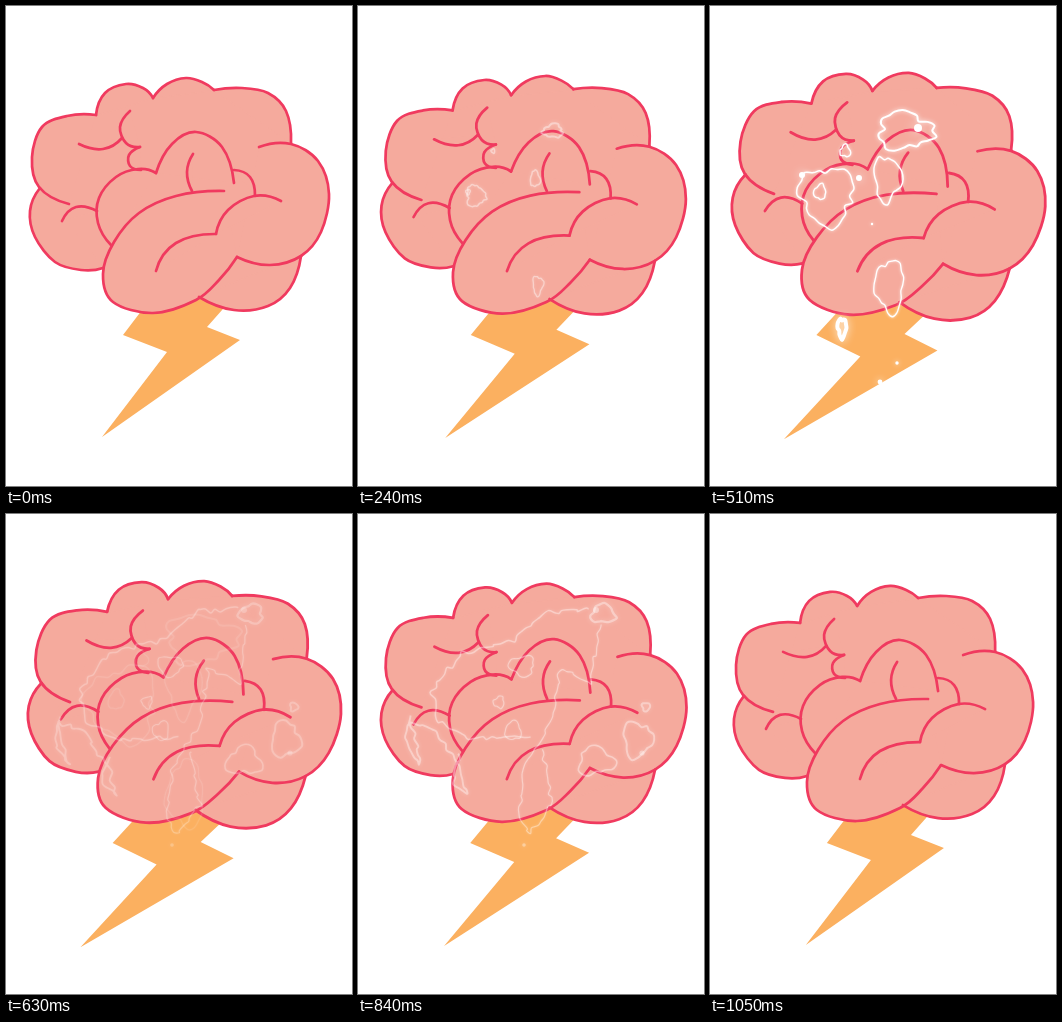
Write an HTML page with a canvas that moves like this. It is 346 by 480 pixels and loops after 1.08 s.

```html
<!DOCTYPE html>
<html lang="en">
<head>
<meta charset="utf-8">
<title>Brainstorm</title>
<style>
html, body { margin: 0; width: 100%; height: 100%; overflow: hidden; background: #fff; }
canvas { display: block; width: 346px; height: 480px; }
</style>
</head>
<body>
<canvas id="stage" width="346" height="480"></canvas>
<script>
const ctx = document.getElementById('stage').getContext('2d');
const LOOP = 1080, STEP = 30, PEAK = 560;
const PINK = '#f5aa9d', RED = '#f03a5f', ORANGE = '#fbb060';

const pair = flat => flat.reduce((out, v, i) =>
  (i % 2 ? out[out.length - 1].push(v) : out.push([v]), out), []);
const clamp = v => Math.max(0, Math.min(1, v));
const ramp = (t, a, b) => clamp((t - a) / (b - a));
const noise = n => {
  const v = Math.sin(n * 12.9898) * 43758.5453;
  return (v - Math.floor(v)) * 2 - 1;
};

// Smooth path through points; open ends continue their curvature.
function spline(pts, closed) {
  const n = pts.length;
  const extend = (a, b, c) => [0, 1].map(k => 3 * a[k] - 3 * b[k] + c[k]);
  const at = i => {
    if (closed) return pts[(i + n) % n];
    if (i < 0) return extend(pts[0], pts[1], pts[2]);
    if (i >= n) return extend(pts[n - 1], pts[n - 2], pts[n - 3]);
    return pts[i];
  };
  const path = new Path2D();
  path.moveTo(...pts[0]);
  for (let i = 0; i < (closed ? n : n - 1); i++) {
    const [p, a, b, q] = [at(i - 1), at(i), at(i + 1), at(i + 2)];
    path.bezierCurveTo(a[0] + (b[0] - p[0]) / 6, a[1] + (b[1] - p[1]) / 6,
                       b[0] - (q[0] - a[0]) / 6, b[1] - (q[1] - a[1]) / 6, ...b);
  }
  return path;
}

function polygon(flat) {
  const path = new Path2D();
  pair(flat).forEach(p => path.lineTo(...p));
  path.closePath();
  return path;
}

// Brain folds at rest, as key points.
const folds = [];
const fold = (...flat) => folds.push(spline(pair(flat)));
fold(63,198, 33,181, 26,151, 36,121, 61,110, 90,109);
fold(90,109, 99,87, 120,78, 137,82, 147,92);
fold(147,92, 161,78, 180,72, 196,76, 208,84);
fold(208,84, 236,82, 262,87, 280,105, 285,137);
fold(253,141, 285,138, 312,155, 323,188, 315,226, 295,250, 264,259, 231,251);
fold(295,250, 284,282, 262,300, 228,304, 193,291);
fold(231,251, 213,274, 190,294, 147,307, 107,296, 97,268, 108,236, 133,207, 170,190, 218,185);
fold(34,182, 24,205, 29,231, 49,256, 75,264, 97,262);
fold(56,215, 70,201, 91,205);
fold(105,239, 92,217, 93,192, 110,171, 132,163, 150,167);
fold(150,167, 166,138, 190,126, 216,141, 228,177);
fold(228,164, 244,171, 249,190);
fold(187,148, 181,166, 186,185);
fold(210,228, 222,204, 248,190, 275,195);
fold(150,265, 170,237, 210,228);
fold(73,138, 97,143, 116,132);
fold(124,105, 114,121, 120,137, 134,141);
fold(134,141, 123,149, 124,160, 135,164);

const core = polygon([34,182, 90,109, 147,92, 208,84, 285,137, 295,250, 193,291, 97,262]);
const bolt = polygon([152,283, 117,329, 161,346, 96,431, 234,334, 201,321, 232,286]);

// Electric shapes come in phases: [first seen, full, fading, gone].
const CHARGE = [180, 330, 530, 640], FLASH = [420, 500, 530, 600], STORM = [600, 730, 770, 880];
const sparks = [];
const ring = (phase, width, x, y, rx, ry) => sparks.push({ phase, width, x, y, rx, ry });
const strand = (phase, width, ...flat) => sparks.push({ phase, width, pts: pair(flat) });

ring(CHARGE, 1.5, 118, 190, 26, 29);
ring(CHARGE, 1.3, 180, 279, 14, 26);
ring(CHARGE, 1.4, 110, 186, 6, 8);
ring(CHARGE, 1.4, 135, 145, 5, 6);
ring(CHARGE, 2, 195, 125, 27, 18);
ring(CHARGE, 1.5, 177, 173, 13, 22);
ring(FLASH, 4, 132, 322, 4, 10);
ring(STORM, 2.3, 245, 100, 12, 9);
ring(STORM, 1.6, 238, 247, 18, 13);
ring(STORM, 2, 280, 226, 15, 17);
ring(STORM, 2, 288, 193, 4, 4);
ring(STORM, 1.2, 164, 152, 12, 10);
ring(STORM, 1.2, 141, 188, 5, 6);
ring(STORM, 1.1, 155, 217, 8, 9);
strand(STORM, 1.5, 232,95, 190,98, 155,127, 104,139, 74,177, 79,207, 112,225, 179,223);
strand(STORM, 1.2, 241,110, 234,169, 202,156, 195,205, 166,256, 162,305, 172,320, 194,290, 183,231);
strand(STORM, 1.9, 53,202, 47,225, 62,252, 54,208, 77,217, 103,254, 109,282, 96,270, 103,235);

const glints = [];
const glint = (phase, x, y, r) => glints.push({ phase, x, y, r });
glint(FLASH, 208, 122, 4);
glint(FLASH, 92, 169, 3);
glint(FLASH, 149, 172, 3);
glint(FLASH, 162, 218, 1.2);
glint(FLASH, 187, 357, 1.7);
glint(FLASH, 170, 376, 2.4);
glint(STORM, 238, 96, 3);
glint(STORM, 284, 239, 2.6);
glint(STORM, 166, 331, 1.8);

function swell(t) {
  const u = t < PEAK ? t / PEAK : (LOOP - t) / (LOOP - PEAK);
  return (1 - Math.cos(Math.PI * u)) / 2;
}

// Slight turn and growth about the middle of the brain.
function tilt(p) {
  const cx = 190, cy = 185;
  ctx.translate(cx + 7.5 * p, cy + 0.5 * p);
  ctx.transform(1 + 0.04 * p, 0.09 * p, -0.107 * p, 1 + 0.042 * p, 0, 0);
  ctx.translate(-cx, -cy);
}

function drawBrain() {
  ctx.fillStyle = ORANGE;
  ctx.fill(bolt);
  ctx.lineCap = ctx.lineJoin = 'round';
  ctx.lineWidth = 2.7;
  ctx.fillStyle = ctx.strokeStyle = PINK;
  ctx.fill(core);
  ctx.stroke(core);
  folds.forEach(f => ctx.fill(f));
  ctx.strokeStyle = RED;
  folds.forEach(f => ctx.stroke(f));
}

function ringPath(s, t, seed) {
  const size = s.phase === CHARGE ? (t - 90) / 420 : 1;
  const count = 12 + Math.round((s.rx + s.ry) / 4);
  const pts = Array.from({ length: count }, (_, i) => {
    const a = i / count * 2 * Math.PI;
    const r = size * (1 + 0.16 * Math.sin(3 * a + seed + t / 150) + 0.13 * noise(seed * 31 + i));
    return [s.x + s.rx * r * Math.cos(a), s.y + s.ry * r * Math.sin(a)];
  });
  return spline(pts, true);
}

function strandPath(s, t, seed) {
  const out = [];
  s.pts.slice(1).forEach(([bx, by], i) => {
    const [ax, ay] = s.pts[i];
    const parts = Math.ceil(Math.hypot(bx - ax, by - ay) / 6);
    for (let k = 0; k < parts; k++) {
      const id = seed * 53 + i * 19 + k * 2 + t / 60;
      out.push([ax + (bx - ax) * k / parts + 2.4 * noise(id),
                ay + (by - ay) * k / parts + 2.4 * noise(id + 1)]);
    }
  });
  return spline(out);
}

function glow([a, b, c, d], t, blur) {
  ctx.globalAlpha = ramp(t, a, b) * (1 - ramp(t, c, d));
  ctx.shadowBlur = blur;
  return ctx.globalAlpha > 0;
}

function drawSparks(t) {
  ctx.fillStyle = ctx.strokeStyle = '#fff';
  ctx.shadowColor = 'rgba(255,255,255,0.8)';
  sparks.forEach((s, i) => {
    if (!glow(s.phase, t, s.width * 2.2)) return;
    ctx.lineWidth = s.width;
    ctx.stroke(s.pts ? strandPath(s, t, i) : ringPath(s, t, i));
  });
  glints.forEach(g => {
    if (!glow(g.phase, t, g.r * 3)) return;
    ctx.beginPath();
    ctx.arc(g.x, g.y, g.r, 0, 2 * Math.PI);
    ctx.fill();
  });
}

function draw(t) {
  ctx.fillStyle = '#fff';
  ctx.fillRect(0, 0, 346, 480);
  ctx.save();
  tilt(swell(t));
  drawBrain();
  ctx.restore();
  ctx.save();
  drawSparks(t);
  ctx.restore();
}

const start = performance.now();
function tick() {
  const t = (performance.now() - start) % LOOP;
  draw(Math.floor(t / STEP) * STEP);
  requestAnimationFrame(tick);
}
tick();
</script>
</body>
</html>
```
